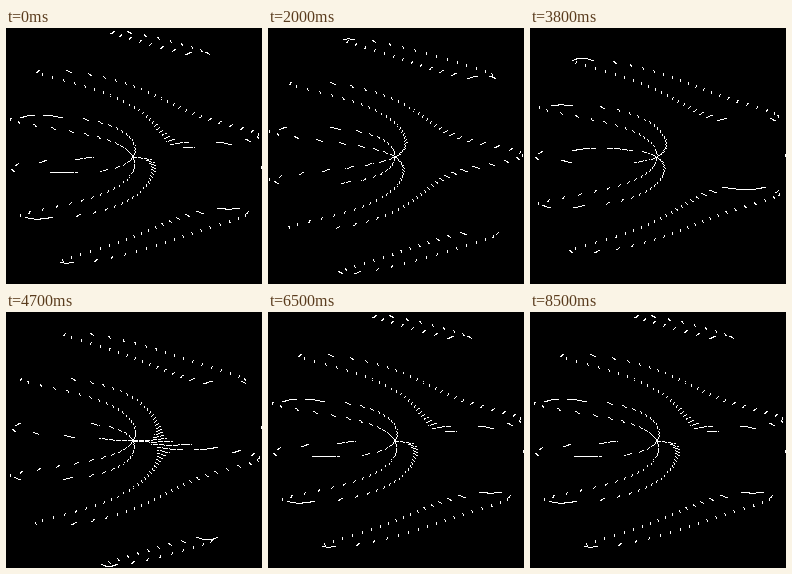
Animation, 256 px wide and 256 px high, one loop 8600 ms. Source, as an HTML page with a canvas:

```html
<!DOCTYPE html>
<html>
<head>
<meta charset="utf-8">
<title>Rolling shutter rose</title>
<style>
html, body { margin: 0; width: 100%; height: 100%; overflow: hidden; background: #000; }
canvas { display: block; width: 256px; height: 256px; image-rendering: pixelated; }
</style>
</head>
<body>
<canvas id="stage" width="256" height="256"></canvas>
<script>
const SIZE = 256, R = 128, CX = 127, CY = 128;
const STRIP = 3, STRIPS = 85;   // the shutter reads 85 strips of 3 rows
const TURN = 6, START = 102;    // degrees per strip, angle of the first strip
const SAMPLES = 1000, LOOP = 8600, STEP = 100;
const rad = Math.PI / 180;
const ctx = document.getElementById('stage').getContext('2d');

// One full scan of a spinning three-petal rose r = R cos 3a.
function scan(n) {
  const img = ctx.createImageData(SIZE, SIZE);
  const px = new Uint32Array(img.data.buffer).fill(0xff000000);
  for (let s = 0; s < STRIPS; s++) {
    const turn = (START - TURN * (STRIPS * n + s)) * rad;
    for (let j = 0; j < SAMPLES; j++) {
      const a = j / SAMPLES * Math.PI;
      const r = R * Math.cos(3 * a);
      const y = CY - Math.floor(r * Math.sin(a + turn));
      if (Math.floor(y / STRIP) !== s) continue;
      const x = Math.floor(CX + r * Math.cos(a + turn)) & 255; // wraps at the edge
      px[y * SIZE + x] = 0xffffffff;
    }
  }
  return img;
}

// Four scans turn the rose by a whole number of petals.
const scans = [0, 1, 2, 3].map(scan);
let shown = -1;

function draw(now) {
  const t = now % LOOP;
  const n = Math.max(0, Math.floor(t / STEP) - 1) % scans.length;
  if (n !== shown) ctx.putImageData(scans[shown = n], 0, 0);
}

const t0 = performance.now();
function tick() {
  draw(performance.now() - t0);
  requestAnimationFrame(tick);
}
tick();
</script>
</body>
</html>
```
